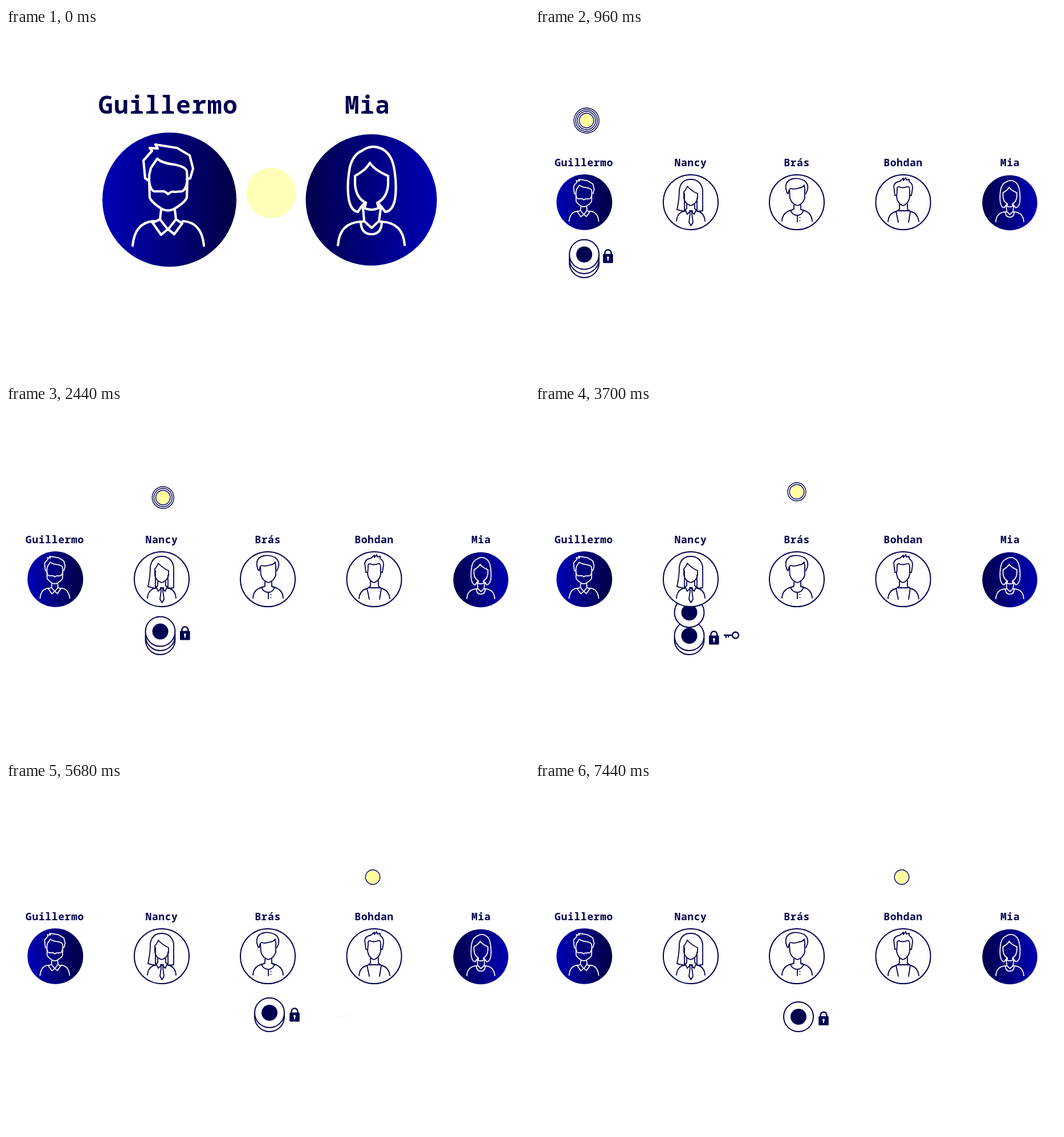
Recreate the animation shown at these times as an HTML page. Size 917x611 px, loop 8000 ms.

```html
<!DOCTYPE html>
<html lang="en">
<head>
<meta charset="utf-8">
<title>Relay</title>
<style>
  html, body { margin: 0; height: 100%; overflow: hidden; background: #fff; }
  svg { display: block; width: 100%; height: 100%; }
  text {
    font: bold 18px "Noto Sans Mono", "DejaVu Sans Mono", monospace;
    letter-spacing: .034em; fill: #000050; text-anchor: middle;
  }
  path { fill: none; stroke-linecap: round; stroke-linejoin: round; }
  .lead path { stroke: #fff; stroke-width: 4.2; }
  .peer path { stroke: #000050; stroke-width: 1.8; }
  .line { fill: #fff; stroke: #000050; stroke-width: 2; }
  .ring { fill: #fff; stroke: #000050; stroke-width: 1.4; }
  .dark { fill: #000050; }
</style>
</head>
<body>
<svg viewBox="0 0 917 611">
  <defs>
    <linearGradient id="left"><stop stop-color="#0000b2"/><stop offset=".1" stop-color="#0000ac"/><stop offset=".92" stop-color="#00004c"/></linearGradient>
    <linearGradient id="right"><stop offset=".06" stop-color="#000052"/><stop offset=".92" stop-color="#0000ac"/></linearGradient>
    <g id="coin"><circle class="line" r="26"/><circle class="dark" r="14"/></g>
  </defs>

  <circle id="glow" fill="#ffffa0"/>

  <g id="stack">
    <use href="#coin" y="411"/>
    <use href="#coin" id="coin2"/>
    <use href="#coin" id="coin1"/>
  </g>

  <g class="peer">
    <text x="273" y="242">Nancy</text>
    <circle class="line" cx="273" cy="305" r="48"/>
    <path d="M262 321L249 318Q253 300 253 283Q256 265 273 265Q290 265 294 283V320L284 321
      M262 321V290M267 277Q264 284 261 287V298Q263 308 273 311Q283 308 285 298V290Q274 285 267 277
      M284 298V321M266 309V316L263 319M280 309V316L283 319M263 318L267 326L273 320L279 326L283 318
      M271 320H276L275 325L277 340L273.5 346L270 340L272 325Z
      M248 338Q249 323 263 320M298 338Q297 323 283 320"/>
  </g>

  <g class="lead" id="leadA">
    <circle cx="286.5" cy="300.5" r="117.5" fill="url(#left)"/>
    <path d="M251 268L244 263L241 232L256 215L252 210L266 211L262 204L300 210L322 223L328 246L323 263L317 265
      M251 268V258L254 245L265 229Q275 237 295 239Q316 243 317 251L318 265
      M251 268L252 297Q255 305 272 316Q284 323 296 316Q314 305 317 297L318 265
      M251 268Q253 284 260 286H273Q279 285 284 291Q290 285 296 287L308 286Q316 284 318 265
      M272 318L270 335L284 353L298 335L296 318
      M270 335L257 341L272 362L284 352L295 361L309 342L298 335
      M222 381Q226 340 259 338M347 381Q343 340 310 338"/>
  </g>
  <text id="nameA">Guillermo</text>

  <g class="lead" id="leadZ">
    <circle cx="640.5" cy="301" r="115" fill="url(#right)"/>
    <path d="M629 306Q622 313 617 322Q605 320 601 300Q597 275 603 243Q609 221 624 215Q640 203 658 211Q675 219 680 243Q686 275 682 300Q678 320 665 322Q659 313 652 306
      M638 236Q632 248 612 259V274Q614 298 631 306L629 314M638 236Q645 248 670 259V274Q668 298 651 306L653 314
      M624 313Q640 323 658 313
      M626 316L628 338L641 350L654 338L657 316
      M628 338L622 340Q623 361 641 361Q658 361 659 340L654 338
      M582 380Q585 341 622 339M699 380Q696 341 659 339"/>
  </g>
  <text id="nameZ">Mia</text>

  <g class="peer">
    <text x="459" y="242">Brás</text>
    <circle class="line" cx="459" cy="305" r="48"/>
    <path d="M444 290L442 289L440 282Q438 267 452 264Q462 262 472 267Q480 273 478 283L475 290
      M444 290Q445 282 448 281Q455 283 463 280Q470 279 472 275Q474 283 473 290
      M446 283L447 298Q450 308 460 311Q470 308 473 298V284
      M454 310V317L449 319M466 310V317L471 319M448 319Q451 328 460 328Q468 328 471 319
      M433 338Q434 321 453 318M486 338Q485 321 466 318M460 328V339M464.5 332V332M464.5 337V337"/>
  </g>
  <g class="peer">
    <text x="645.5" y="242">Bohdan</text>
    <circle class="line" cx="645.5" cy="305" r="48"/>
    <path d="M633 293H631L629 277Q630 270 640 268L646 263V267L650 262L651 266L656 265V269Q662 272 662 280L660 293H657
      M635 284Q634 278 638 278Q645 281 652 278Q657 276 657 284V296Q655 308 645 311Q636 308 634 296Z
      M639 308V317L634 321M653 308V317L658 321M637 320H656M633 321L637 340M658 321L655 340
      M619 339Q620 324 634 321M673 339Q671 324 658 321"/>
  </g>

  <g id="lock">
    <path d="M-5.5 -15V-17.8A5.5 5.5 0 0 1 5.5 -17.8V-15" stroke="#000050" stroke-width="2.4"/>
    <rect class="dark" x="-8.8" y="-16" width="17.6" height="16" rx="1.5"/>
    <path d="M0 -9V-5" stroke="#fff" stroke-width="2"/>
    <circle cy="-9.5" r="2" fill="#fff"/>
  </g>
  <path id="key" d="M-12 0H2M-9 0V4M-5 0V3M13 0A5.5 5.5 0 1 1 2 0A5.5 5.5 0 1 1 13 0" stroke="#000050" stroke-width="2.3"/>

  <g id="onion">
    <circle class="ring" r="22"/>
    <circle class="ring" r="19"/>
    <circle class="ring" r="16"/>
    <circle class="ring" r="12.7"/>
    <circle r="11.3" fill="#ffffa0"/>
  </g>
</svg>
<script>
const LOOP = 8000;
const $ = id => document.getElementById(id);
const rings = document.querySelectorAll('.ring');
const peers = document.querySelectorAll('.peer');

const mix = (a, b, p) => a + (b - a) * p;
const part = (t, a, b) => Math.min(1, Math.max(0, (t - a) / (b - a)));
const ease = (t, a, b) => { const p = part(t, a, b); return p * p * (3 - 2 * p); };
// Each step is [begin, end, value]: glide from the previous value.
const track = (t, value, ...steps) =>
  steps.reduce((v, [a, b, to]) => mix(v, to, ease(t, a, b)), value);
const set = (el, attrs) => { for (const k in attrs) el.setAttribute(k, attrs[k]); };
const move = (el, x, y) => set(el, { transform: `translate(${x} ${y})` });

function lead(id, p, from, to, name) {
  const [x, y, r] = from, s = mix(r, to[2], p) / r;
  set($('lead' + id), {
    transform: `translate(${mix(x, to[0], p)} ${mix(y, to[1], p)}) scale(${s}) translate(${-x} ${-y})`
  });
  set($('name' + id), { x: mix(name[0], name[1], p), y: mix(150, 242, p) });
  $('name' + id).style.fontSize = mix(name[2], 18, p) + 'px';
}

function draw(t) {
  const p = ease(t, 580, 965), shown = t < 580 ? 0 : 1;

  const g = 1 - (1 - part(t, 580, 960)) ** 2.5;
  set($('glow'), { cx: mix(465, 165, g), cy: mix(289, 216, g), r: mix(44, 128, g), opacity: .75 * (1 - g) });

  lead('A', p, [286.5, 300.5, 117.5], [86.5, 305, 48.8], [284.5, 85.7, 43]);
  lead('Z', p, [640.5, 301, 115], [832.5, 306, 48.2], [634, 833, 42.2]);
  peers.forEach(el => set(el, { opacity: p }));

  const toNext = [960, 1340], toThird = [4540, 4930];
  const drift = p - 1;
  move($('stack'), track(t, 86.3, [...toNext, 270.5], [...toThird, 462]) + drift, 0);
  set($('stack'), { opacity: shown });
  set($('coin1'), { y: track(t, 396.5, [3470, 3950, 326]), opacity: t < 3950 ? 1 : 0 });
  set($('coin2'), { y: track(t, 404, [6980, 7430, 326]), opacity: t < 7430 ? 1 : 0 });

  move($('lock'),
    track(t, 128, [...toNext, 313.8], [...toThird, 506]) + drift,
    track(t, 411.5, [3300, 3690, 419.5], [6400, 6800, 426]));
  set($('lock'), { opacity: shown });

  // The key slides in, dips towards the lock and fades.
  const first = t < 4530;
  const [a, use, out, x, y] = first ? [2460, 2900, 4220, 344, 403] : [5640, 6160, 6700, 539, 411];
  const dip = 5 * Math.sin(Math.PI * part(t, use, use + 360));
  move($('key'), x + 51 * (1 - ease(t, a, use - 20)) - dip, y);
  set($('key'), { opacity: ease(t, a, use - 20) * (1 - ease(t, out, out + 280)) });

  const hops = [toNext, [2450, 2880], toThird];
  const arc = hops.reduce((h, [b, c]) => {
    const q = ease(t, b, c);
    return h + 220 * q * (1 - q);
  }, 0);
  move($('onion'),
    track(t, 90.3, [...hops[0], 275.3], [...hops[1], 459], [...hops[2], 643]) + drift,
    track(t, 162, [...hops[1], 152], [...hops[2], 166.5]) - arc - drift);
  set($('onion'), { opacity: shown });
  [2080, 2900, 5340].forEach((b, i) => set(rings[i], { opacity: 1 - ease(t, b, b + 350) }));
}

function tick() {
  draw(performance.now() % LOOP);
  requestAnimationFrame(tick);
}
tick();
</script>
</body>
</html>
```
